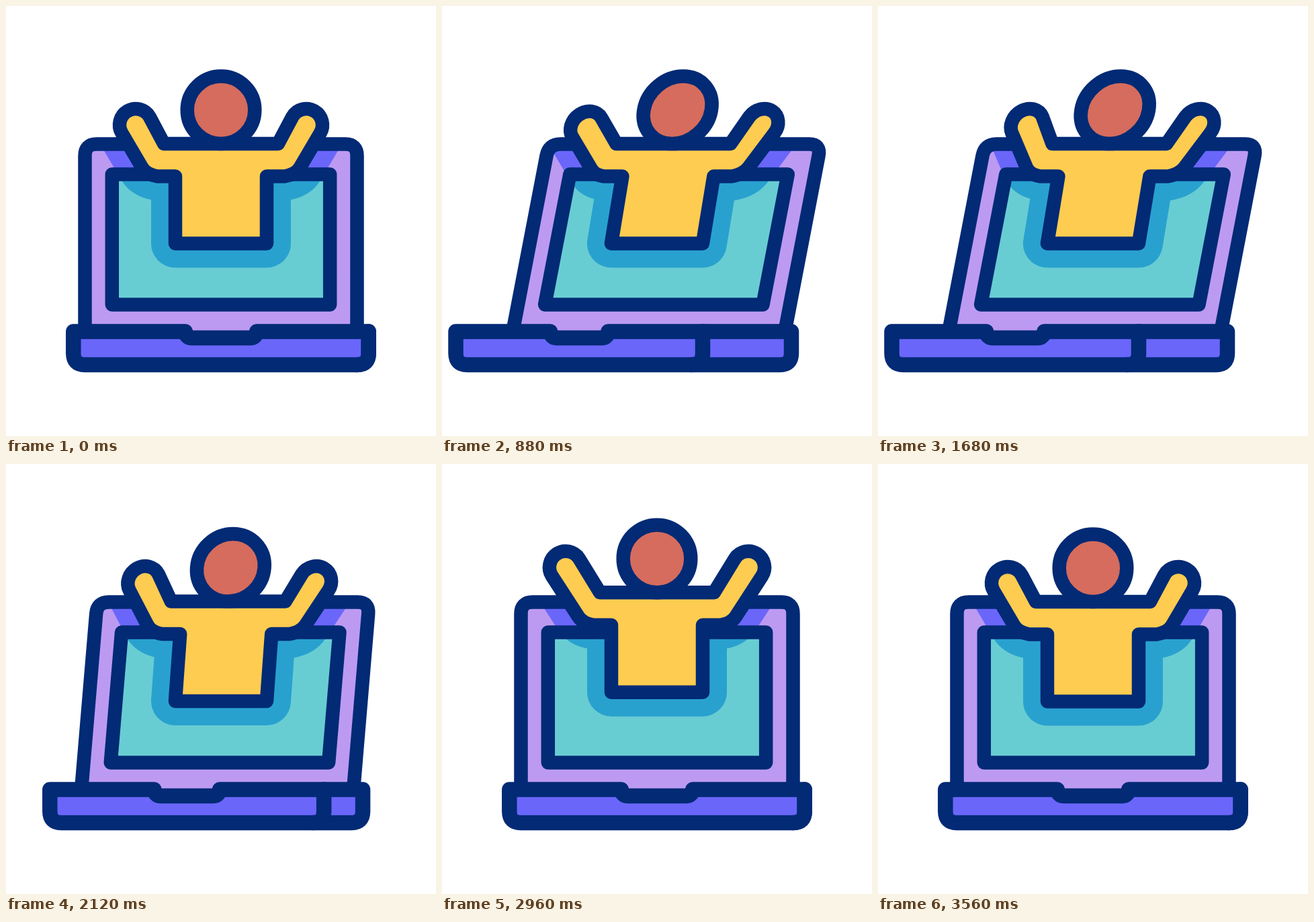
Write an HTML page with a canvas that moves like this. It is 640 px wide and 640 px high and loops after 3.6 s.

```html
<!DOCTYPE html>
<html lang="en">
<head>
<meta charset="utf-8">
<title>Laptop cheer</title>
<style>
  html, body { margin: 0; width: 100%; height: 100%; overflow: hidden; background: #fff; }
  canvas { display: block; width: 640px; height: 640px; }
</style>
</head>
<body>
<canvas id="stage" width="640" height="640"></canvas>
<script>
const ctx = document.getElementById('stage').getContext('2d');
const LOOP = 3600;
const NAVY = '#022a75', YELLOW = '#fecc50', RED = '#d56c5d', TEAL = '#68cdd2',
      SEA = '#29a1cf', LILAC = '#bc9af2', BLUE = '#6a66fa', ORANGE = '#ff9200';

// Each track lists [time, value] pairs, eased in and out between them.
const TRACKS = {
  turn: [[0, 0], [420, 1], [1910, 1], [2300, 0]],
  bob: [[2093, 0], [2440, 1], [2787, 0], [3133, 1], [3480, 0]],
  reach: [[0, 0], [210, 2.29], [415, 0], [630, 1], [840, 0], [1267, 0], [1472, 1], [1682, 0]],
  dip: [[840, 0], [1057, 1], [1267, 0]],
  sway: [[0, 0], [210, 1], [415, 0], [630, 1], [840, 0], [1057, -1], [1267, 0], [1472, 1], [1682, 0]],
  rayEnd: [[2270, 0], [2455, 1], [2858, 1], [2859, 0], [2963, 0], [3148, 1], [3551, 1], [3552, 0]],
  rayStart: [[2460, 0], [2858, 1], [2859, 0], [3153, 0], [3551, 1], [3552, 0]]
};

function at(name, t) {
  const keys = TRACKS[name];
  if (t <= keys[0][0]) return keys[0][1];
  for (let i = 1; i < keys.length; i++) {
    const [t0, a] = keys[i - 1], [t1, b] = keys[i];
    if (t < t1) {
      const u = (t - t0) / (t1 - t0);
      return a + (b - a) * u * u * (3 - 2 * u);
    }
  }
  return keys[keys.length - 1][1];
}

const mix = (a, b, u) => a + (b - a) * u;

// Builds a path in a space leaned sideways around the height y0.
function leaned(k, y0, dy, build) {
  const local = new Path2D(), out = new Path2D();
  build(local);
  out.addPath(local, new DOMMatrix([1, 0, -k, 1, k * y0, dy]));
  return out;
}

function fill(path, color) {
  ctx.fillStyle = color;
  ctx.fill(path);
}

function stroke(path, color, width) {
  ctx.strokeStyle = color;
  ctx.lineWidth = width;
  ctx.stroke(path);
}

function castShadow(surface, body, color) {
  ctx.save();
  ctx.clip(surface);
  fill(body, color);
  stroke(body, color, 72);
  ctx.restore();
}

function lidPath(p) {
  p.moveTo(117.5, 486);
  p.lineTo(117.5, 223);
  p.quadraticCurveTo(117.5, 205.5, 135, 205.5);
  p.lineTo(505, 205.5);
  p.quadraticCurveTo(522.5, 205.5, 522.5, 223);
  p.lineTo(522.5, 486);
}

// Outline points of one arm: hand centre (hx, hy), side -1 left or 1 right.
function armShape(hx, hy, side) {
  const px = 320 + side * 97, py = 228, r = 24;
  const len = Math.hypot(px - hx, py - hy);
  const ux = (px - hx) / len, uy = (py - hy) / len;
  const nx = side * uy, ny = -side * ux;   // towards the lower edge
  return {
    hx, hy, r,
    angle: Math.atan2(ny, nx),
    low: [px + nx * r, py + ny * r],
    bend: [px + nx * r + ux * 12, py + ny * r + uy * 12]
  };
}

function bodyPath(p, left, right) {
  p.moveTo(235, 205);
  p.arc(left.hx, left.hy, left.r, left.angle + Math.PI, left.angle, true);
  p.lineTo(...left.low);
  p.quadraticCurveTo(...left.bend, 225, 253.5);
  p.lineTo(252, 253.5);
  p.lineTo(252, 353.5);
  p.lineTo(388, 353.5);
  p.lineTo(388, 253.5);
  p.lineTo(415, 253.5);
  p.quadraticCurveTo(...right.bend, ...right.low);
  p.arc(right.hx, right.hy, right.r, right.angle, right.angle + Math.PI, true);
  p.lineTo(405, 205);
  p.closePath();
}

function drawRays(from, to) {
  if (to <= 0 || from >= 1) return;
  const tips = [[147, 178], [200, 58], [320, 24], [440, 58], [489, 178]];
  const rays = new Path2D();
  for (const [x, y] of tips) {
    const dx = x - 320, dy = y - 178;
    const inner = 60 / Math.hypot(dx, dy);
    const a = mix(inner, 1, from), b = mix(inner, 1, to);
    rays.moveTo(320 + dx * a, 178 + dy * a);
    rays.lineTo(320 + dx * b, 178 + dy * b);
  }
  stroke(rays, ORANGE, 22);
}

function drawBase(turn) {
  const l = mix(100.3, 20.5, turn), r = mix(539.7, 520, turn), edge = mix(539.7, 388, turn);
  const mid = (l + edge) / 2, half = mix(53, 43, turn);
  const top = 484.5, low = 534, c = 17;
  const base = new Path2D();
  base.moveTo(l, top);
  base.lineTo(mid - half, top);
  base.quadraticCurveTo(mid - half + 1, 494, mid - half + 9, 494);
  base.lineTo(mid + half - 9, 494);
  base.quadraticCurveTo(mid + half - 1, 494, mid + half, top);
  base.lineTo(r, top);
  base.lineTo(r, low - c);
  base.quadraticCurveTo(r, low, r - c, low);
  base.lineTo(l + c, low);
  base.quadraticCurveTo(l, low, l, low - c);
  base.closePath();
  fill(base, BLUE);
  stroke(base, NAVY, 22.5);

  const corner = new Path2D();
  corner.moveTo(edge, top);
  corner.lineTo(edge, low - c);
  corner.quadraticCurveTo(edge, low, edge - c, low);
  stroke(corner, NAVY, 22.5);
}

function draw(t) {
  const turn = at('turn', t), bob = at('bob', t), reach = at('reach', t), dip = at('dip', t);
  const lidLean = 0.192 * turn, bodyLean = 0.165 * turn, lift = -27.5 * bob;

  const left = armShape(193 - 18 * bob - 63 * dip, 177 - 18.5 * bob + 40 * dip, -1);
  const right = armShape(447 + 18 * bob + 48 * reach, 177 - 18.5 * bob + 13 * reach, 1);

  const lid = leaned(lidLean, 421, 0, lidPath);
  const screen = leaned(lidLean, 420, 0, p => p.rect(157.8, 250.5, 324.4, 194));
  const body = leaned(bodyLean, 353, lift, p => bodyPath(p, left, right));
  const head = leaned(bodyLean, 353, lift,
    p => p.arc(320 + 22 * at('sway', t), 154.8, 50.3, 0, 2 * Math.PI));

  ctx.fillStyle = '#fff';
  ctx.fillRect(0, 0, 640, 640);
  ctx.lineJoin = ctx.lineCap = 'round';

  drawRays(at('rayStart', t), at('rayEnd', t));

  fill(lid, LILAC);
  castShadow(lid, body, BLUE);
  stroke(lid, NAVY, 20.5);

  fill(screen, TEAL);
  castShadow(screen, body, SEA);
  stroke(screen, NAVY, 20.5);

  fill(body, YELLOW);
  stroke(body, NAVY, 20.5);
  fill(head, RED);
  stroke(head, NAVY, 20.5);

  drawBase(turn);
}

const start = performance.now();
function tick() {
  draw((performance.now() - start) % LOOP);
  requestAnimationFrame(tick);
}
tick();
</script>
</body>
</html>
```
